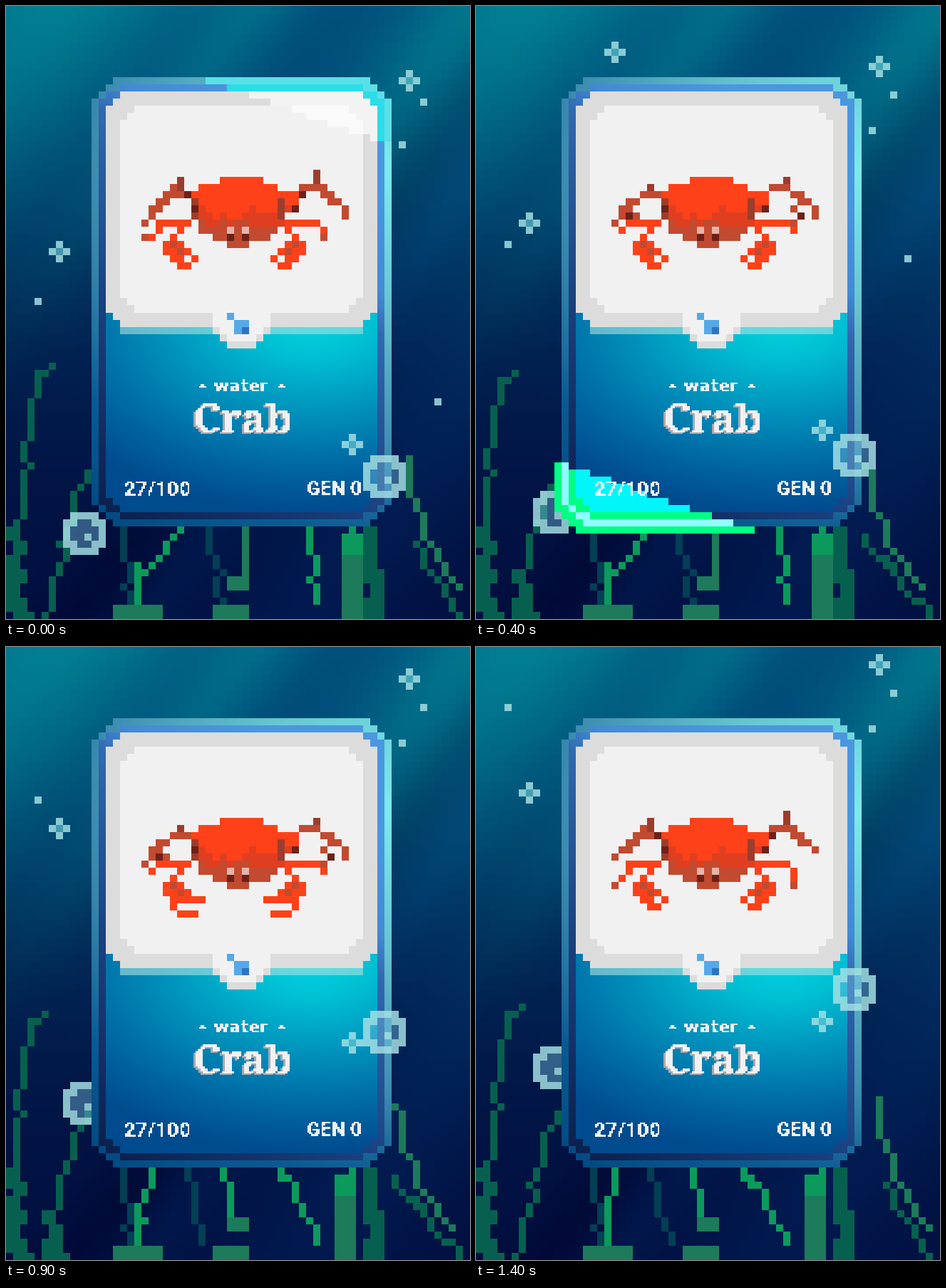
These frames come from a looping animation (651x861 px, 1.5 s). An HTML page with a canvas:

```html
<!DOCTYPE html>
<html lang="en">
<head>
<meta charset="utf-8">
<title>Water card</title>
<style>
html, body { margin: 0; width: 100%; height: 100%; overflow: hidden; background: #00204f; }
canvas { display: block; width: 651px; height: 861px; }
</style>
</head>
<body>
<canvas id="stage" width="651" height="861"></canvas>
<script>
const W = 651, H = 861, COLS = 65, ROWS = 86, STEP = 100, FRAMES = 15;
let ctx = document.getElementById('stage').getContext('2d');
const px = c => Math.round(c * W / COLS);
const py = r => Math.round(r * H / ROWS);
const clamp = (v, lo, hi) => Math.min(hi, Math.max(lo, v));
const lerp = (a, b, k) => a + (b - a) * k;
const bell = (u, center, width) => Math.exp(-(((u - center) / width) ** 2));
const rand = n => Math.abs(Math.sin(n * 12.9898) * 43758.5453) % 1;

const RED = '#ff4119', SHADE = '#e03e20', RUST = '#c24a30', BROWN = '#9c3d2c', DARK = '#6d2118';
const KELP = '#07604f', MOSS = '#1d7a5a', LEAF = '#0b9a5c', DEEP = '#033f55';
const FOAM = 'rgba(165,224,228,.84)';

// All drawing helpers take grid cells
function box(color, x, y, w = 1, h = 1) {
  ctx.fillStyle = color;
  ctx.fillRect(px(x), py(y), px(x + w) - px(x), py(y + h) - py(y));
}
function line(color, points) {
  for (let i = 1; i < points.length; i++) {
    const [x0, y0] = points[i - 1], [x1, y1] = points[i];
    const n = Math.max(1, Math.ceil(Math.max(Math.abs(x1 - x0), Math.abs(y1 - y0))));
    for (let k = 0; k <= n; k++) box(color, Math.round(lerp(x0, x1, k / n)), Math.round(lerp(y0, y1, k / n)));
  }
}
// Rectangle with stepped corners; insets run from the outer row inwards
function plate(color, x, y, w, h, insets) {
  insets.forEach((d, i) => {
    box(color, x + d, y + i, w - 2 * d);
    box(color, x + d, y + h - 1 - i, w - 2 * d);
  });
  const n = insets.length;
  box(color, x, y + n, w, h - 2 * n);
}
function paint(gradient, ...stops) {
  for (const [p, c] of stops) gradient.addColorStop(p, c);
  return gradient;
}
function layer(w, h, render) {
  const canvas = document.createElement('canvas'), main = ctx;
  canvas.width = w;
  canvas.height = h;
  ctx = canvas.getContext('2d');
  render();
  ctx = main;
  return canvas;
}

const sea = layer(W, H, () => {
  for (let r = 0; r < ROWS; r++) for (let c = 0; c < COLS; c++) {
    const x = c * 10, y = r * 10, u = x + .75 * y;
    const deep = 1 / (1 + Math.exp((y - 360) / 125));
    const ray = bell(u, 60, 170) + .5 * bell(u, 340, 60) + .8 * bell(u, 650, 80) - .15 * bell(u, 470, 60);
    const glow = ray * Math.max(0, 1 - y / 560);
    const tint = bell(u, 1050, 130) + .6 * bell(u, 830, 50) - .7 * bell(u, 730, 60);
    const g = 15 + 74 * deep + 42 * glow + 9 * tint;
    const b = 64 + 66 * deep + 20 * glow + 14 * tint;
    box(`rgb(1,${g | 0},${b | 0})`, c, r);
  }
});

// A curved stalk from tip to foot, one step per row
function stalk(color, tipX, tipY, footX, footY, curve) {
  const points = [];
  for (let y = tipY; y <= footY; y++) {
    const t = (y - tipY) / (footY - tipY);
    points.push([lerp(tipX, footX, t ** curve) + .35 * Math.sin(y * 1.1 + tipX), y]);
  }
  line(color, points);
}
// A ragged clump that widens downwards
function clump(color, x, y, w, h) {
  for (let i = 0; i < h; i++) {
    const seed = Math.floor(i / 2) + x;
    box(color, x + Math.floor(rand(seed) * 1.7), y + i, Math.ceil(w * lerp(.35, 1, i / h) * (.6 + .4 * rand(seed + 9))));
  }
}
function kelp(f) {
  const bend = f < 3 || f > 11 ? 0 : f < 5 || f > 8 ? 1 : 2;
  const sway = bend * bend, far = bend === 2;
  const lean = f < 5 ? 0 : f < 11 ? 1 : 1.2;

  stalk(KELP, 6 - sway, 50 + bend, 1.3 - sway, 76, .37);
  clump(KELP, 0, 73, 4, 13);
  stalk(KELP, 11, far ? 54 : 65, 5.5 - sway / 2, 85, far ? 1 : .7);
  if (bend === 1) clump(KELP, 5, 79, 3, 7);
  stalk(MOSS, 56 - 1.5 * sway, far ? 73 : 63 + bend, 63 - sway, 81, far ? 1 : 2);
  stalk(KELP, far ? 52 : 57 - 3 * bend, far ? 71 : 75 - bend, 63, 85, 1);

  stalk(DEEP, 16, 73, 17, 84, 1);
  stalk(DEEP, 28 - 3 * lean, 73, 30 - 3 * lean, 83, 1);
  clump(KELP, 50, 73, 4, 13);
  stalk(LEAF, 24 - 4 * lean, 73, 18, 81, .8);
  box(LEAF, 18, 78, 1, 6);
  box(MOSS, 15, 84, 7, 2);
  stalk(lean ? LEAF : MOSS, 33 - 2.5 * lean, 73, 33 - 1.5 * lean, 80, 1);
  box(MOSS, 31, 80, 3, 2);
  box(MOSS, 29, 84, 5, 2);
  stalk(LEAF, 42 - 4 * lean, 73, 43, 83, .8);
  const trunk = 47 - Math.round(lean);
  box(LEAF, 48, 73, 1, 2);
  box(LEAF, trunk, 74, 3, 3);
  box(MOSS, trunk, 77, 3, 9);
}

function plus(x, y) {
  for (const [dx, dy] of [[0, -1], [-1, 0], [1, 0], [0, 1]]) box(FOAM, x + dx, y + dy);
  box('rgba(110,205,215,.62)', x, y);
}
function bubble(x, y) {
  for (let j = 0; j < 6; j++) for (let i = 0; i < 6; i++) {
    const d = Math.hypot(i - 2.5, j - 2.5);
    if (d > 3) continue;
    const rim = d > 2 || (i === 3 && j === 3);
    box(rim ? FOAM : 'rgba(120,190,225,.42)', x + i, y + j);
  }
}

// A limb and its mirror image about half of sum
function pair(color, points, sum = 63, rise = 0) {
  line(color, points);
  line(color, points.map(([x, y]) => [sum - x, y - rise]));
}
function crab(f) {
  const beat = (f + 2) % FRAMES;
  const lift = beat > 5 ? 0 : beat % 3 === 1 ? 2 : 1;
  const open = f >= 8 && f < 12;

  pair(RUST, [[25, 26], [23, lift ? 25 : 26], [20, 28], [19, 30 - lift / 2]], 66, 1);
  pair(RUST, [[23, 26], [21, 28], [lift ? 21 : 22, 29 - lift]], 66, 1);
  pair(RED, [[25, 30], [21, 30], [20, 31 + lift / 2]], 64);
  pair(RUST, [[19, 30 + 1.5 * lift], [19, 30 + 1.5 * lift]]);
  pair(BROWN, [[24, lift ? 24 : 25], [24, 25]], 67, 1);
  pair(DARK, [[lift ? 25 : 21, lift ? 26 : 29], [lift ? 25 : 21, lift ? 26 : 29]], 66);

  pair(RED, [[24, 30], [24, 31], [23, 32]]);
  pair(RED, [[22, 33], [24, 33], [25, 34], [22, 34]]);
  pair(RUST, [[23, 33], [24, 34]]);
  if (open) {
    pair(RED, [[23, 35], [27, 35]]);
    pair(RED, [[23, 36], [25, 37], [26, 37]]);
  } else {
    pair(RED, [[23, 35], [24, 35], [25, 36], [24, 36]]);
    pair(RED, [[26, 35], [26, 35]]);
  }

  for (let y = 24; y < 34; y++) {
    const half = 7 * Math.sqrt(1 - ((y - 27) / (y < 27 ? 3.4 : 6.15)) ** 2);
    for (let x = 25; x < 41; x++) {
      const d = x + .5 - 32.8;
      if (Math.abs(d) >= half) continue;
      const tone = (y - 24) / 9 + Math.max(0, Math.abs(d) - 4) * .07 + .25 * (rand(x * 7 + y) - .5);
      box(y < 28 || tone < .52 ? RED : tone < .7 ? SHADE : RUST, x, y);
    }
  }
  box(RED, 38, 26, 3, 2);
  pair(BROWN, [[26, 27], [26, 29]], 64);
  pair(DARK, [[26, 28], [26, 28]], 66);
  for (const x of [31, 33]) {
    box('#e6b4ab', x, 31);
    box(DARK, x, 32);
  }
}

const outerPaint = paint(ctx.createRadialGradient(520, 230, 0, 520, 230, 640),
  [0, '#7cecf0'], [.3, '#66c4d0'], [.62, '#3c8cb0'], [.8, '#0a5a92'], [1, '#00477f']);
const innerPaint = paint(ctx.createLinearGradient(520, 250, 140, 720),
  [0, '#4a97e0'], [.19, '#438ad4'], [.27, '#3068b0'], [.6, '#1b4180'], [1, '#0b1f4c']);
const waterPaint = paint(ctx.createRadialGradient(0, 0, 0, 0, 0, 270),
  [0, '#00d4e2'], [.2, '#00bfd3'], [.5, '#008fba'], [.8, '#0063a0'], [1, '#004b8e']);

function tab(color, inset, bottom) {
  for (let y = 43; y <= bottom; y++) box(color, 28 + inset + Math.max(0, y - 44), y, 10 - 2 * inset - 2 * Math.max(0, y - 44));
}
function water(late, lit) {
  ctx.save();
  ctx.beginPath();
  for (let y = 42; y < 71; y++) {
    const inset = Math.max(0, y - 68);
    ctx.rect(px(14 + inset), py(y), px(52 - inset) - px(14 + inset), py(y + 1) - py(y));
  }
  ctx.clip();
  ctx.translate(430, 440);
  ctx.scale(1.6, 1);
  const fills = lit ? [waterPaint, late ? 'rgba(0,255,255,.95)' : 'rgba(105,246,250,.65)'] : [waterPaint];
  for (const fill of fills) {
    ctx.fillStyle = fill;
    ctx.fillRect(-200, -30, 300, 320);
  }
  ctx.restore();
}
function card(f, lit) {
  const late = f >= 4;
  plate(lit ? (late ? '#8ffcff' : '#5ae0e6') : outerPaint, 12, 10, 42, 63, [3, 2, 1]);
  plate(lit ? (late ? '#00ff84' : '#2cdce8') : innerPaint, 13, 11, 40, 61, [3, 1, 0]);
  water(late, lit);

  plate('#dcdcdc', 14, 12, 38, 33, [2, 1, 0]);
  box('rgba(170,225,225,.6)', 16, 45, 34);
  tab('#dcdcdc', 0, 47);
  plate('#f1f1f1', 16, 14, 34, 29, [2, 1, 0]);
  tab('#f1f1f1', 1, 46);
  box('#55a9e8', 31, 43);
  box('#55a9e8', 32, 44, 2, 2);
  box('#2e73c2', 33, 45);
  crab(f);
  if (lit) {
    const veil = 'rgba(255,255,255,.66)';
    plate(veil, 14, 12, 38, 33, [2, 1, 0]);
    tab(veil, 0, 47);
  }
}

// Diagonal glint sweeping down, with a fringe one cell outside the card
function shine(f) {
  if (f > 4) return;
  const low = 57 + 160 * f + 6 * f * f;
  ctx.save();
  ctx.beginPath();
  for (let c = 11; c < 54; c++) {
    const slope = .35 * (c * 10 - 140);
    const top = Math.round((low - 143 + slope) / 10), bottom = Math.round((low + slope) / 10);
    ctx.rect(px(c), py(top), px(c + 1) - px(c), py(bottom) - py(top));
  }
  ctx.clip();
  plate(f < 4 ? '#00cfdd' : '#00ff84', 11, 11, 42, 63, [3, 2, 1]);
  card(f, true);
  ctx.restore();
}

// Text drawn small and enlarged without smoothing
function pixelText(text, x, y, font, size, cell, color) {
  const w = Math.ceil(180 / cell), h = Math.ceil(70 / cell), base = Math.round(55 / cell);
  const art = layer(w, h, () => {
    ctx.font = `${font.weight} ${size / cell}px ${font.family}`;
    ctx.textAlign = 'center';
    ctx.fillStyle = color;
    ctx.fillText(text, w / 2, base);
    const image = ctx.getImageData(0, 0, w, h);
    for (let i = 3; i < image.data.length; i += 4) image.data[i] = image.data[i] > 115 ? 255 : 0;
    ctx.putImageData(image, 0, 0);
  });
  ctx.drawImage(art, x - w * cell / 2, y - base * cell, w * cell, h * cell);
}
const labels = layer(W, H, () => {
  const wide = { weight: 'bold', family: '"DejaVu Sans", sans-serif' };
  const slab = { weight: 900, family: '"Noto Serif", serif' };
  const info = { weight: 'bold', family: 'Roboto, sans-serif' };
  const white = '#f1f1f1';
  ctx.imageSmoothingEnabled = false;
  pixelText('-', 275.5, 541, wide, 24, 2.5, white);
  pixelText('water', 329.5, 541, wide, 23.5, 2.5, white);
  pixelText('-', 386.5, 541, wide, 24, 2.5, white);
  pixelText('Crab', 329, 601, slab, 58, 3.4, '#a9a9b0');
  pixelText('Crab', 332, 599, slab, 58, 3.4, white);
  pixelText('27/100', 212, 688, info, 29, 2.5, white);
  pixelText('GEN 0', 460, 687, info, 28, 2.5, white);
});

function draw(f) {
  const drift = clamp((f - 2) * 3 / 7, 0, 3) + (f > 11 ? 1.5 : 0);
  const rise = (y, speed) => y - Math.round(drift * speed);
  ctx.drawImage(sea, 0, 0);
  kelp(f);
  bubble(8, rise(71, 3.3));
  plus(7, 34 - f);
  plus(19, 14 - 2 * f);
  plus(56, rise(10, 1.85));
  box(FOAM, 58, rise(13, 1.6));
  box(FOAM, 55, rise(19, 1.85));
  box(FOAM, 60, Math.round(55 - 3.5 * f - .37 * f * f));
  box(FOAM, 4, Math.round(41 - 1.9 * f - .035 * f * f));
  card(f, false);
  shine(f);
  ctx.drawImage(labels, 0, 0);
  plus(48, rise(61, 1.9));
  bubble(50, rise(63, 4.05));
}

let shown = -1;
function tick() {
  const f = Math.floor(performance.now() / STEP) % FRAMES;
  if (f !== shown) draw(shown = f);
  requestAnimationFrame(tick);
}
tick();
</script>
</body>
</html>
```
